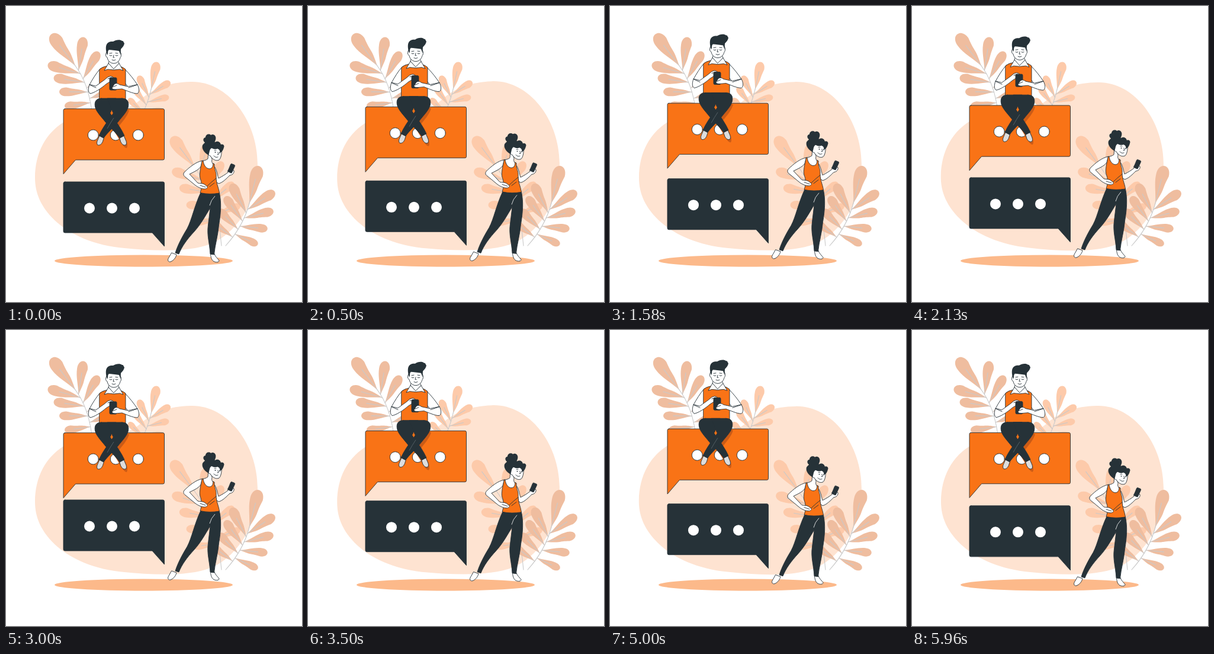
An HTML page for the animation above (6000 ms loop, 500 px wide and 500 px high).

```html
<!DOCTYPE html>
<html lang="en">
<head>
<meta charset="utf-8">
<title>Chatting</title>
<style>
  html, body { margin: 0; width: 100%; height: 100%; overflow: hidden; background: #fff; }
  svg { display: block; width: 100vw; height: 100vh; }
  .line { stroke: #263238; stroke-width: .9; stroke-linejoin: round; stroke-linecap: round; }
  .white { fill: #fff; }
  .grey { fill: #ddd; }
  .orange { fill: #f97316; }
  .dark { fill: #263238; }
  .none { fill: none; }
  .stem { fill: none; stroke: #c9c9c9; stroke-width: 1.1; stroke-linecap: round; }
</style>
</head>
<body>
<svg viewBox="0 0 500 500">
  <path id="blob" fill="#fee3d1" d="M312 128C372 126 425 190 425 268C425 345 376 391 345 402C310 416 250 414 200 409C150 405 110 386 88 367C58 341 49 315 49 290C49 250 66 212 105 192C150 176 195 186 225 160C250 138 275 129 312 128Z"/>
  <g id="plants"></g>
  <ellipse cx="232.5" cy="430.5" rx="150.5" ry="10" fill="#fcb98a"/>

  <g id="woman">
    <path class="dark line" d="M99.500 297H265Q267.500 297 267.500 299.500V406L247 383H99.500Q97 383 97 380.500V299.500Q97 297 99.500 297Z"/>
    <g class="white dots" data-y="341.5" data-x="141"></g>
    <!-- shoes and trousers -->
    <path class="white line" d="M280 417L288 420C287 425 283 430 278 432C274 433 272 429 275 425Z"/>
    <path class="white line" d="M345.500 419L352 418.500C353 423 358 427 360 430C360 433 355 433.500 351 431.500C347 429 346 424 345.500 419Z"/>
    <path class="dark line" d="M329 315L360.500 316C364 332 363 350 359.500 370C358 388 353 404 351.500 420L345 419C344 400 339 388 341.500 370L345 341C337 354 329 369 318 381C306 394 297 406 292 419L286 417C290 404 298 389 306 376C314 361 318 338 329 315Z"/>
    <path class="none" stroke="#fff" stroke-width=".8" d="M353 321Q346 328 344 337"/>
    <!-- far arm with phone -->
    <path class="white line" d="M351 270C356 275 357 285 359 291C365 288 370 285 375 281C374 278 376 275 379 275L385 278C386 283 381 286 378 286C372 292 365 299 359 300C352 297 350 283 349 274Z"/>
    <path class="dark line" d="M381 266.500L386 268.500Q387 269 386.500 270.500L381.500 281.500Q381 282.500 380 282L375.500 280Q374.500 279.500 375 278.500L379.500 267.500Z"/>
    <!-- neck, chest and top -->
    <path class="white line" d="M342 244L341 258C338 261 333 261 328 263L332 276H350L352 268C348 266 347 264 348 259Z"/>
    <path class="orange line" d="M333 261.500C334 269 338 275 344 275C349 274 350 270 349.500 265.500L352 267C351 275 356 281 355 289C355 300 359 306 360.500 316Q344 319 328 315.500C331 307 331 298 328 291C326 283 329 276 330.500 262Z"/>
    <path class="line none" d="M355 291Q346 298 339 305M352 299L344 305"/>
    <!-- near arm -->
    <path class="white line" d="M331 261.500C321 263 309 273 301 281C299 284 300 287 303 289L320 303C324 306 330 309 335 309C339 309 341 307 340 305L335 301C331 299 327 300 324 299L310 284C318 280 327 276 329 271Z"/>
    <path class="line none" d="M328 303L337 306"/>
    <!-- head -->
    <path class="white line" d="M343 236L365 240C364 248 364 256 360 260C354 263 348 258 345 253C340 252 339 246 342 244Z"/>
    <path class="dark" d="M342 252C335 248 330 241 332 235C336 230 337 230 338 232C332 229 332 223 337 222C337 217 343 215 346 218C351 215 356 220 354 226C353 229 352 230 353 230C358 227 362 230 363 234C366 232 370 236 368 239C367 243 365 247 361 248C362 244 360 242 357 241C353 243 350 241 347 240C343 243 344 248 342 252Z"/>
    <circle cx="353.500" cy="247" r=".9" class="dark"/>
    <circle cx="361" cy="248" r=".9" class="dark"/>
    <path class="line none" d="M352 244Q354 243 355 244M358 247L359 251L357 251M351 253Q354 257 358 255"/>
  </g>

  <g id="man">
    <path class="orange line" d="M99.500 173.700H265Q267.500 173.700 267.500 176V257.500Q267.500 260 265 260H117.500L97 283.700V176Q97 173.700 99.500 173.700Z"/>
    <g class="white line dots" data-y="218" data-x="147.3"></g>
    <path fill="#cb5b16" d="M204 175L208 176C205 187 196 196 190 204L202 224Q207 235 204 240Q200 240 196 233L180 207Z"/>
    <!-- shirt and vest -->
    <path class="white line" d="M166 103L159 106C152 114 146 124 141 133L153 139L159 130ZM195 103L201 107C209 115 216 124 222 133L207 138L201 130Z"/>
    <path class="orange line" d="M158 107Q162 103 170 101.500H190Q198 103 202 107V161H158Z"/>
    <path class="white line" d="M175 90L173 97L182 108L191 97L188 90Z"/>
    <path class="white line" d="M173 97L166 109L172 107L182 108L192 107L198 109L191 97L182 106Z"/>
    <!-- legs: one drawn, the other mirrored -->
    <g id="leg">
      <path class="grey line" d="M192 223L199 219L202 226Q205 232 202 235Q197 236 194 230Z"/>
      <path class="dark line" d="M161 156H186L176 181L182 190C188 198 195 208 200 219L192 223C186 214 176 206 168 196C160 186 152 178 150.500 170C149 162 152 156 161 156Z"/>
    </g>
    <use href="#leg" transform="matrix(-1 0 0 1 357 0)"/>
    <path class="none" stroke="#667177" stroke-width=".7" d="M182 189Q176 198 171 207"/>
    <path class="orange" d="M176 180H181L178.500 184.500Z"/>
    <!-- forearms and phone -->
    <path class="white line" d="M141 133C139 138 138 145 142 148C149 147 161 139 169 132L180 125L181 120Q177 117 172 120L166 125L152 135Z"/>
    <path class="dark line" d="M177 121H185Q187 121 187 123V140Q187 142 185 142H177Q175 142 175 140V123Q175 121 177 121Z"/>
    <path class="white line" d="M222 133C225 138 226 145 222 148C214 148 204 143 196 140L185 141Q179 141 179 138L183 132Q187 129 192 133L206 136Z"/>
    <path class="line none" d="M180 137L187 134M172 123L178 121M141 133L152 138M222 133L207 138"/>
    <!-- head -->
    <path class="white line" d="M171.500 76C168 79 167 85 171 87C172 93 177 97 182 97C188 97 192 92 193 87C195 86 195 79 193 78L190 72H173Z"/>
    <path class="dark" d="M171 83C169 78 168 70 169.500 66C172 60 177 60 181 60C185 57 193 56 196 59C199 59 198 61 200 63C199 69 195 71 194 73L193.500 83L191 76C184 75 178 74 174 74C171 76 173 80 171 83Z"/>
    <path class="line none" d="M175 83.500Q177 85 179 83.500M185 83.500Q187 85 189 83.500M175 80L179 79.500M185 79.500L189 80M182 83L181 87H183M179 91Q182 93 185 91"/>
  </g>
</svg>
<script>
const byId = id => document.getElementById(id);

for (const group of document.querySelectorAll(".dots")) {
  const { x, y } = group.dataset;
  group.innerHTML = [0, 1, 2].map(i => `<circle cx="${+x + 38 * i}" cy="${y}" r="9"/>`).join("");
}

// Teardrop leaf: pointed at its base, round at its tip.
function leaf({ x, y }, heading, length, width) {
  const h = width / 2;
  const side = s => `${length * .3} ${s * h * .35} ${length * .5} ${s * h}`;
  return `<g transform="translate(${x} ${y}) rotate(${heading})">
    <path d="M0 0C${side(-1)} ${length * .76} ${-h}C${length * 1.08} ${-h} ${length * 1.08} ${h} ${length * .76} ${h}C${side(1)} 0 0Z"/>
    <path class="stem" d="M0 0H${length * .65}"/></g>`;
}

// Point and heading on a quadratic stem given by three [x, y] points.
function along([a, b, c], t) {
  const at = i => (1 - t) ** 2 * a[i] + 2 * t * (1 - t) * b[i] + t * t * c[i];
  const slope = i => (1 - t) * (b[i] - a[i]) + t * (c[i] - b[i]);
  return { x: at(0), y: at(1), heading: Math.atan2(slope(1), slope(0)) * 180 / Math.PI };
}

// Leaf pairs spread wider and get smaller down the stem.
function plant({ color, stem, size, pairs, gap, first, lean = 0 }) {
  let leaves = "";
  for (let k = 0; k < pairs; k++) {
    for (const side of [-1, 1]) {
      const start = side < 0 ? first + gap * .4 : first;
      const base = along(stem, Math.max(0, 1 - start - gap * k));
      const turn = side * (43 + 14 * k) + lean;
      leaves += leaf(base, base.heading + turn, size * (.92 - .07 * k), size * (.29 - .025 * k));
    }
  }
  const end = along(stem, 1);
  leaves += leaf(end, end.heading, size * 1.08, size * .36);
  return `<g fill="${color}">${leaves}<path class="stem" d="M${stem[0]}Q${stem[1]} ${stem[2]}"/></g>`;
}

byId("plants").innerHTML = [
  { color: "#efbd9f", stem: [[145, 178], [139, 130], [117, 101]], size: 62, pairs: 4, gap: .21, first: .13, lean: -2 },
  { color: "#fdcaaa", stem: [[228, 187], [240, 164], [245, 141]], size: 44, pairs: 3, gap: .28, first: .18 },
  { color: "#fdcaaa", stem: [[364, 405], [358, 325], [319, 273]], size: 60, pairs: 4, gap: .17, first: .13 },
  { color: "#efbd9f", stem: [[371, 405], [401, 372], [411, 333]], size: 60, pairs: 4, gap: .19, first: .14, lean: -5 }
].map(plant).join("");

// Linear rise of 10 units and back over one period.
const float = (t, period) => -10 * (1 - Math.abs(1 - 2 * (t % period) / period));

// Linear sway through 0, -1, +1 and 0 degrees.
function sway(t, period) {
  const p = (t % period) / period;
  return p < .25 ? -4 * p : p < .75 ? 4 * p - 2 : 4 - 4 * p;
}

function draw(t) {
  byId("man").setAttribute("transform", `translate(0 ${float(t, 3000)})`);
  byId("woman").setAttribute("transform", `translate(0 ${float(t, 6000)})`);
  byId("blob").setAttribute("transform", `rotate(${sway(t, 3000)} 237 271)`);
}

let start;
function tick(now) {
  start ??= now;
  draw((now - start) % 6000);
  requestAnimationFrame(tick);
}
draw(0);
requestAnimationFrame(tick);
</script>
</body>
</html>
```
